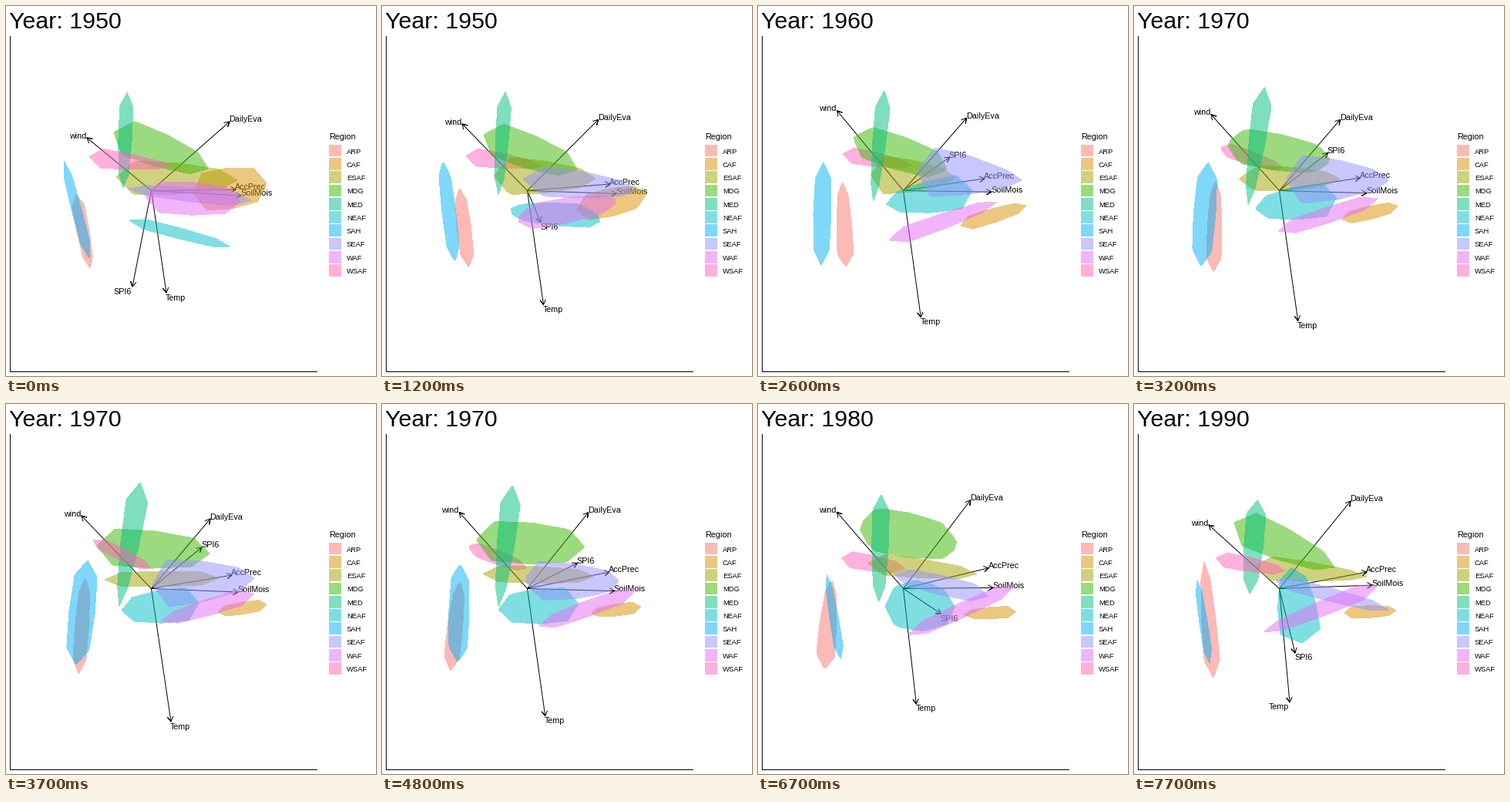
Write a matplotlib script that moves like this. It is 480 px wide and 480 px high and loops after 8000 ms.

```python
import numpy as np
import matplotlib.pyplot as plt
from matplotlib.animation import FuncAnimation
from matplotlib.patches import Polygon, Rectangle

plt.rcParams["font.family"] = "Liberation Sans"

SIZE, DPI = 480, 72            # at 72 dpi one point is one pixel
HOLD, MOVE, CYCLE = 6, 12, 19  # frames: first hold, morph, whole state
FIRST_YEAR, MORPHS = 1950, 4
ORIGIN = np.array([188.5, 239.5])
MIDDLE = (204, 256.5)          # centre of the panel
HEAD = 7.0                     # arrow head length
N_POINTS = 120                 # outline points used while morphing

fig = plt.figure(figsize=(SIZE / DPI, SIZE / DPI), dpi=DPI, facecolor="white")
ax = fig.add_axes([0, 0, 1, 1])
ax.set_xlim(0, SIZE)
ax.set_ylim(SIZE, 0)
ax.axis("off")


def hull(x1, y1, x2, y2, w1, w2):
    """Pointed outline around a spine, w1 and w2 wide near its ends."""
    start, spine = np.array([x1, y1]), np.array([x2 - x1, y2 - y1])
    normal = np.array([-spine[1], spine[0]]) / np.hypot(*spine)
    along = np.array([0, 0.15, 0.5, 0.85, 1, 0.85, 0.5, 0.15])
    bulge = 0.575 * (w1 + w2)
    width = np.array([0, w1, bulge, w2, 0, -w2, -bulge, -w1])
    return start + np.outer(along, spine) + np.outer(width / 2, normal)


def resample(points):
    """Spread points evenly along a closed outline."""
    loop = np.vstack([points, points[:1]])
    dist = np.append(0, np.hypot(*np.diff(loop, axis=0).T).cumsum())
    at = np.arange(N_POINTS) * dist[-1] / N_POINTS
    return np.column_stack([np.interp(at, dist, c) for c in loop.T])


def align(start, end):
    """Rotate the end outline so that its points travel least."""
    rolls = [np.roll(end, r, axis=0) for r in range(N_POINTS)]
    return min(rolls, key=lambda e: ((e - start) ** 2).sum())


regions = []


def region(name, colour, *spines):
    dense = [resample(hull(*s)) for s in spines]
    morphs = [(a, align(a, b)) for a, b in zip(dense, dense[1:])]
    patch = Polygon(dense[0], closed=True, fc=colour, ec="none", alpha=0.5,
                    lw=0, aa=False)
    ax.add_patch(patch)

    y = 187.5 + 17.28 * len(regions)
    ax.add_patch(Rectangle((419.3, y - 7.8), 15.7, 15.7, fc=colour, ec="none",
                           alpha=0.5, lw=0))
    ax.text(442, y + 4, name, size=9.4, va="baseline")
    regions.append((patch, morphs))


# One spine (x1, y1, x2, y2, w1, w2) per decade.
region("ARP", "#F8766D", (91, 245, 109, 340, 16, 12), (110, 229, 116, 337, 13, 21),
       (103, 226, 94, 350, 14, 17), (98, 240, 78, 338, 15, 25), (91, 205, 103, 355, 12, 20))
region("CAF", "#D89000", (243, 243, 338, 230, 48, 44), (262, 286, 348, 259, 18, 14),
       (275, 270, 338, 260, 13, 14), (265, 274, 331, 270, 9, 16), (273, 271, 340, 268, 15, 12))
region("ESAF", "#A3A500", (143, 222, 300, 226, 43, 27), (148, 218, 254, 222, 52, 22),
       (128, 228, 276, 226, 18, 17), (136, 204, 274, 219, 25, 17), (156, 211, 302, 224, 30, 13))
region("MDG", "#39B600", (140, 164, 262, 211, 46, 30), (124, 170, 244, 213, 41, 34),
       (118, 184, 264, 194, 47, 37), (132, 161, 260, 168, 58, 52), (130, 154, 260, 212, 46, 26))
region("MED", "#00BF7D", (157, 112, 152, 236, 17, 13), (163, 111, 150, 252, 18, 10),
       (174, 102, 147, 262, 28, 13), (160, 114, 160, 262, 20, 14), (160, 125, 150, 246, 25, 18))
region("NEAF", "#00BFC4", (160, 278, 290, 312, 13, 11), (168, 256, 280, 237, 27, 44),
       (150, 268, 250, 258, 31, 43), (154, 263, 264, 261, 45, 42), (204, 212, 218, 310, 34, 52))
region("SAH", "#00B0F6", (75, 201, 108, 327, 10, 12), (83, 203, 81, 336, 19, 19),
       (106, 203, 91, 338, 29, 29), (93, 218, 112, 328, 8, 12), (82, 229, 98, 336, 8, 10))
region("SEAF", "#9590FF", (158, 237, 318, 252, 13, 19), (208, 212, 344, 226, 64, 22),
       (190, 234, 322, 226, 61, 30), (174, 217, 282, 240, 24, 27), (184, 229, 330, 267, 17, 13))
region("WAF", "#E76BF3", (181, 247, 304, 253, 40, 34), (168, 306, 308, 255, 21, 13),
       (202, 282, 322, 246, 16, 20), (208, 301, 340, 237, 18, 15), (168, 296, 316, 236, 14, 20))
region("WSAF", "#FF62BC", (108, 196, 214, 208, 25, 10), (110, 193, 200, 207, 21, 10),
       (113, 177, 188, 214, 15, 12), (110, 200, 188, 212, 22, 15), (106, 200, 196, 217, 19, 13))

# Resting outlines stack by group number, morphing ones by its text: 1, 10, 2, ...
resting = range(1, len(regions) + 1)
moving = [sorted(resting, key=str).index(n) + 1 for n in resting]

arrows = []


def arrow(name, *tips):
    line, = ax.plot([], [], color="black", lw=1, zorder=1)
    label = ax.text(0, 0, name, size=10.7, va="baseline", zorder=2)
    arrows.append((line, label, np.array(tips, float)))


# One tip per decade.
arrow("DailyEva", (290, 150), (271, 145), (265, 149), (273, 124), (281, 126))
arrow("wind", (105, 171), (103, 135), (98, 145), (105, 132), (97, 157))
arrow("AccPrec", (298, 238), (294, 224), (293, 222), (298, 210), (302, 218))
arrow("SoilMois", (305, 246), (303, 241), (301, 244), (303, 240), (309, 235))
arrow("SPI6", (164, 364), (248, 197), (254, 186), (252, 247), (209, 323))
arrow("Temp", (208, 372), (211, 403), (214, 412), (207, 390), (202, 387))

ax.plot([5, 5, 403], [39, 474, 474], color="black", lw=1)
ax.text(419, 173, "Region", size=10.7, va="baseline")
title = ax.text(4.5, 29, "", size=30.4, va="baseline")


def arrow_path(tip):
    back = np.arctan2(*(ORIGIN - tip)[::-1])
    barbs = [tip + HEAD * np.array([np.cos(a), np.sin(a)])
             for a in (back - np.pi / 6, back + np.pi / 6)]
    return np.array([ORIGIN, tip, barbs[0], tip, barbs[1]])


def draw(frame):
    step = max(frame - HOLD, 0)
    i = min(step // CYCLE, MORPHS - 1)
    t = min((step - CYCLE * i) / MOVE, 1)

    title.set_text(f"Year: {FIRST_YEAR + 10 * (i + (t > 0.5))}")
    stack = moving if 0 < t < 1 else resting
    for (patch, morphs), level in zip(regions, stack):
        a, b = morphs[i]
        patch.set_xy(a + (b - a) * t)
        patch.set_zorder(3 + level)
    for line, label, tips in arrows:
        tip = tips[i] + (tips[i + 1] - tips[i]) * t
        line.set_data(*arrow_path(tip).T)
        # Labels sit on the outward side of the tip.
        drop = 9.5 if tip[1] > MIDDLE[1] else 0.5
        label.set_position((tip[0] - 0.8, tip[1] + drop))
        label.set_ha("left" if tip[0] > MIDDLE[0] else "right")


anim = FuncAnimation(fig, draw, frames=80, interval=100, init_func=lambda: draw(0),
                     repeat=True, repeat_delay=0)
plt.show()
```
